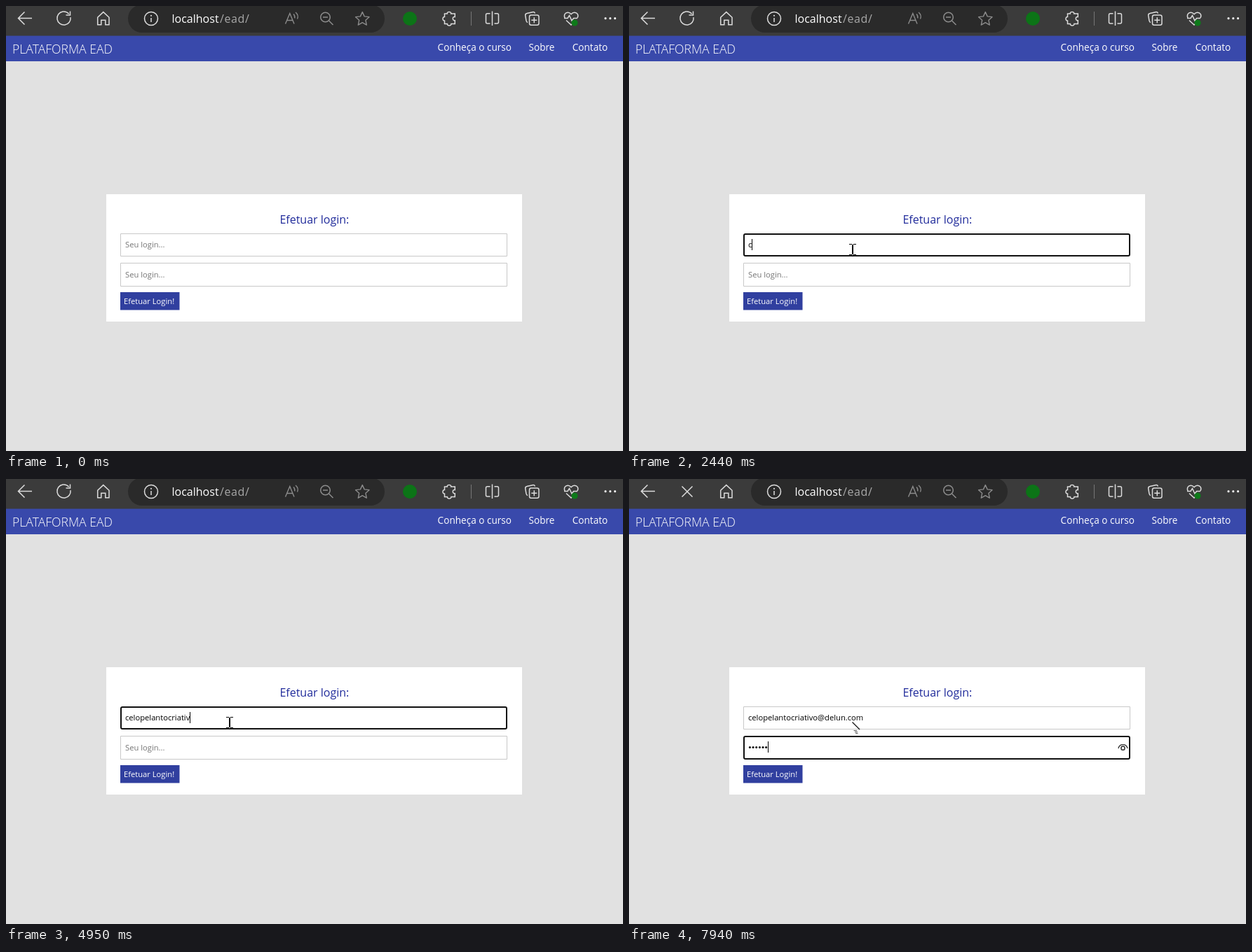
An HTML page with a canvas that plays this animation: 880x636 px, repeating every 8 s.

```html
<!DOCTYPE html>
<html lang="pt-BR">
<head>
<meta charset="utf-8">
<title>Plataforma EAD</title>
<style>
html, body { margin: 0; width: 100%; height: 100%; overflow: hidden; background: #e1e1e1; }
canvas { display: block; }
</style>
</head>
<body>
<canvas id="stage" width="880" height="636"></canvas>
<script>
const ctx = document.getElementById('stage').getContext('2d');
const LOOP = 8000;
const EMAIL = 'celopelantocriativo@delun.com';
const TYPO = 'celopelnat';
const ICON = '#dcdcdc', DIM = '#8c8c8c';

function rect(x, y, w, h, color) {
  ctx.fillStyle = color;
  ctx.fillRect(x, y, w, h);
}

function disc(x, y, r, color) {
  ctx.fillStyle = color;
  ctx.beginPath();
  ctx.arc(x, y, r, 0, Math.PI * 2);
  ctx.fill();
}

function stroke(path, color = ICON, width = 1.5) {
  ctx.strokeStyle = color;
  ctx.lineWidth = width;
  ctx.stroke(new Path2D(path));
}

function ring(x, y, r, color = ICON, from = 0, to = Math.PI * 2) {
  ctx.strokeStyle = color;
  ctx.lineWidth = 1.5;
  ctx.beginPath();
  ctx.arc(x, y, r, from, to);
  ctx.stroke();
}

function text(str, x, y, size, color, weight = 400, spacing = 0) {
  ctx.font = `${weight} ${size}px "Open Sans", sans-serif`;
  ctx.letterSpacing = spacing + 'px';
  ctx.fillStyle = color;
  ctx.fillText(str, x, y);
  return ctx.measureText(str).width;
}

// Number of n evenly spaced steps reached between first and last.
function steps(t, first, last, n) {
  if (t < first) return 0;
  return Math.min(n, Math.floor((t - first) / (last - first) * (n - 1) + 1.001));
}

function typedLogin(t) {
  if (t < 3390) return TYPO.slice(0, Math.round(steps(t, 2440, 3120, 7) * 10 / 7));
  let n = 8 + [3590, 3740, 3880].filter(at => t >= at).length;
  n += steps(t, 4150, 5170, 9) + steps(t, 5360, 6180, 9);
  return EMAIL.slice(0, n);
}

function reloadButton(t) {
  if (t >= 7940) {
    stroke('M75.5 10.5L90.5 25.5M90.5 10.5L75.5 25.5');
    return;
  }
  ring(82.5, 17.5, 9.6, ICON, -0.15, Math.PI * 1.77);
  stroke('M91.5 7.5V13H85.5');
}

function toolbar(t) {
  rect(0, 0, 880, 43, '#3b3b3b');
  ctx.fillStyle = '#2a2a2a';
  ctx.beginPath();
  ctx.roundRect(174, -2, 366, 40, 20);
  ctx.fill();

  stroke('M17.5 17.5H37M26.5 8.5L17.5 17.5L26.5 26.5');
  reloadButton(t);
  stroke('M130.7 16.3L138.8 8.6L147 16.3V26.8H141.8V20.3H135.8V26.8H130.7Z');

  ring(207, 18, 9.5);
  stroke('M207 17V23');
  disc(207, 13.8, 1.1, ICON);
  const urlY = 24;
  text('localhost', 236.5, urlY, 16, '#ffffff');
  text('/ead/', 305, urlY, 16, '#a8a8a8', 400, 0.6);

  stroke('M398.5 25.5L404.8 10.5L411 25.5M400.8 20.5H408.8', DIM, 1.4);
  stroke('M410 11.5Q412.5 14 411.7 17.5M413 9Q417.8 13 415.5 18.5', DIM, 1.3);
  ring(455.5, 16, 6.8, DIM);
  stroke('M460.5 21L466.5 27M452 16H459', DIM);
  star(508.3, 18.8, 10.2, 4.9);
  disc(576, 18, 10, '#0c7417');

  stroke('M625.5 11H629.3C628.5 7.5 635.5 7.5 634.7 11H640.3V15.5C636.3 14.5 636.3 21.5 640.3 20.7V25.5H634.9C635.5 28.8 628.8 28.8 629.4 25.5H625.5V21C622.2 21.5 622.2 15 625.5 15.4Z');
  rect(663, 8, 1, 20, '#757575');
  stroke('M690.5 10.7H686.5Q684.5 10.7 684.5 12.7V23Q684.5 25 686.5 25H690.5M696.5 10.7H700.5Q702.5 10.7 702.5 12.7V23Q702.5 25 700.5 25H696.5M693.5 7.5V28');
  stroke('M749 13H757.5Q760 13 760 15.5V24.8Q760 27.3 757.5 27.3H749Q746.5 27.3 746.5 24.8V15.5Q746.5 13 749 13ZM753.3 16.2V24.2M749.3 20.2H757.3');
  stroke('M744 23.5Q742.3 23 742 21L740.7 13.5Q740.5 11 743 10.5L751 8.7Q753.7 8.2 754.5 10.5');
  stroke('M797 17C794.5 10.5 801.5 6.5 806 11.7C810.5 6.5 818 10.5 815 17M799 20.5L806 27L808.5 24.7');
  stroke('M796 17.5H801L803.5 13.5L807 21L809.5 17.5H815');
  disc(811, 24, 4.6, '#0e7a1a');
  for (const x of [855, 861.8, 868.6]) disc(x, 17.7, 1.6, '#eeeeee');
}

function star(cx, cy, outer, inner) {
  ctx.strokeStyle = DIM;
  ctx.lineWidth = 1.4;
  ctx.lineJoin = 'round';
  ctx.beginPath();
  for (let i = 0; i < 10; i++) {
    const r = i % 2 ? inner : outer, a = i * Math.PI / 5;
    ctx.lineTo(cx + r * Math.sin(a), cy - r * Math.cos(a));
  }
  ctx.closePath();
  ctx.stroke();
  ctx.lineJoin = 'miter';
}

function header() {
  rect(0, 42, 880, 1, '#39426b');
  rect(0, 43, 880, 36, '#3949ab');
  text('PLATAFORMA EAD', 9, 68, 17.6, '#ffffff', 300);
  text('Conheça o curso', 615.6, 64, 13.6, '#ffffff');
  text('Sobre', 745.5, 64, 13.6, '#ffffff');
  text('Contato', 807.7, 64, 13.6, '#ffffff');
}

function field(y, h, focused) {
  ctx.strokeStyle = focused ? '#101010' : '#c8c8c8';
  ctx.lineWidth = focused ? 2 : 1;
  ctx.beginPath();
  if (focused) ctx.roundRect(164, y + 1, 550, h - 2, 2);
  else ctx.rect(163.5, y + 0.5, 551, h - 1);
  ctx.stroke();
}

function caret(x, y) {
  rect(Math.floor(x), y, 1, 16, '#000000');
}

function eye() {
  stroke('M698 385C699.5 377.8 709.5 377.8 711 385', '#333333', 1.4);
  ring(704.5, 384.7, 2.6, '#333333');
}

function form(t) {
  const inLogin = t >= 1610 && t < 6340, inPass = t >= 6340;
  rect(143, 269, 593, 182, '#ffffff');
  text('Efetuar login:', 390.4, 311, 16, '#202b9b');
  field(325, 33, inLogin);
  field(367, 34, inPass);

  const login = typedLogin(t);
  const width = login ? text(login, 170, 345, 11.2, '#000000') : 0;
  if (!login) text('Seu login...', 170, 345, 11.2, '#757575');
  const blinkOff = t >= 2090 && t < 2440;
  if (inLogin && !blinkOff) caret(170 + width, 333);

  const dots = steps(t, 6860, 7650, 6);
  if (dots) {
    for (let i = 0; i < dots; i++) disc(172.4 + i * 4.65, 383.5, 1.5, '#000000');
    eye();
  } else {
    text('Seu login...', 170, 388, 11.2, '#757575');
  }
  if (inPass) caret(170 + dots * 4.7, 375);

  rect(163, 409, 84.5, 25.5, '#303f9f');
  text('Efetuar Login!', 168, 426, 11.2, '#ffffff');
}

const TRACK = [[342, 808, 596], [615, 604, 508], [821, 383, 408], [1095, 314, 364], [1370, 319, 348]];

function pointerAt(t) {
  if (t < 410) return [808, 596];
  const held = 410 + (steps(t, 410, 1370, 15) - 1) * 960 / 14;
  const i = TRACK.findIndex(p => held <= p[0] + 0.01);
  const [t0, x0, y0] = TRACK[i - 1], [t1, x1, y1] = TRACK[i];
  const k = (held - t0) / (t1 - t0);
  return [Math.round(x0 + (x1 - x0) * k), Math.round(y0 + (y1 - y0) * k)];
}

function arrow(x, y) {
  const p = new Path2D(`M${x + 0.5} ${y + 0.5}v14.5l3.4 -3.2l2.3 4.7l2.2 -1l-2.2 -4.6h4.8z`);
  ctx.fillStyle = '#ffffff';
  ctx.fill(p);
  ctx.strokeStyle = '#000000';
  ctx.lineWidth = 1;
  ctx.stroke(p);
}

function beam(x, y, color) {
  rect(x - 1, y - 7, 2, 14, color);
  for (const edge of [y - 8, y + 7]) {
    rect(x - 5, edge, 4, 1, color);
    rect(x + 1, edge, 4, 1, color);
  }
}

function busyPointer() {
  stroke('M318.5 347.5L329 358', '#111111', 1.2);
  stroke('M320.5 359.5H325M322 361.5H326M323 363.5H326.5', '#555555', 1);
}

function pointer(t) {
  if (t < 70) return;
  if (t >= 7800) return busyPointer();
  const [x, y] = pointerAt(t);
  if (x > 736 || y > 451) return arrow(x, y);
  if (t >= 1530 && t < 1610) {
    disc(318, 347, 14, '#fdfb6c');
    beam(x, y, '#595826');
    return;
  }
  // Inverts whatever lies beneath, as text cursors do.
  ctx.globalCompositeOperation = 'difference';
  beam(x, y, '#ffffff');
  ctx.globalCompositeOperation = 'source-over';
}

function draw() {
  const t = performance.now() % LOOP;
  rect(0, 0, 880, 636, '#e1e1e1');
  toolbar(t);
  header();
  form(t);
  pointer(t);
  requestAnimationFrame(draw);
}
draw();
</script>
</body>
</html>
```
